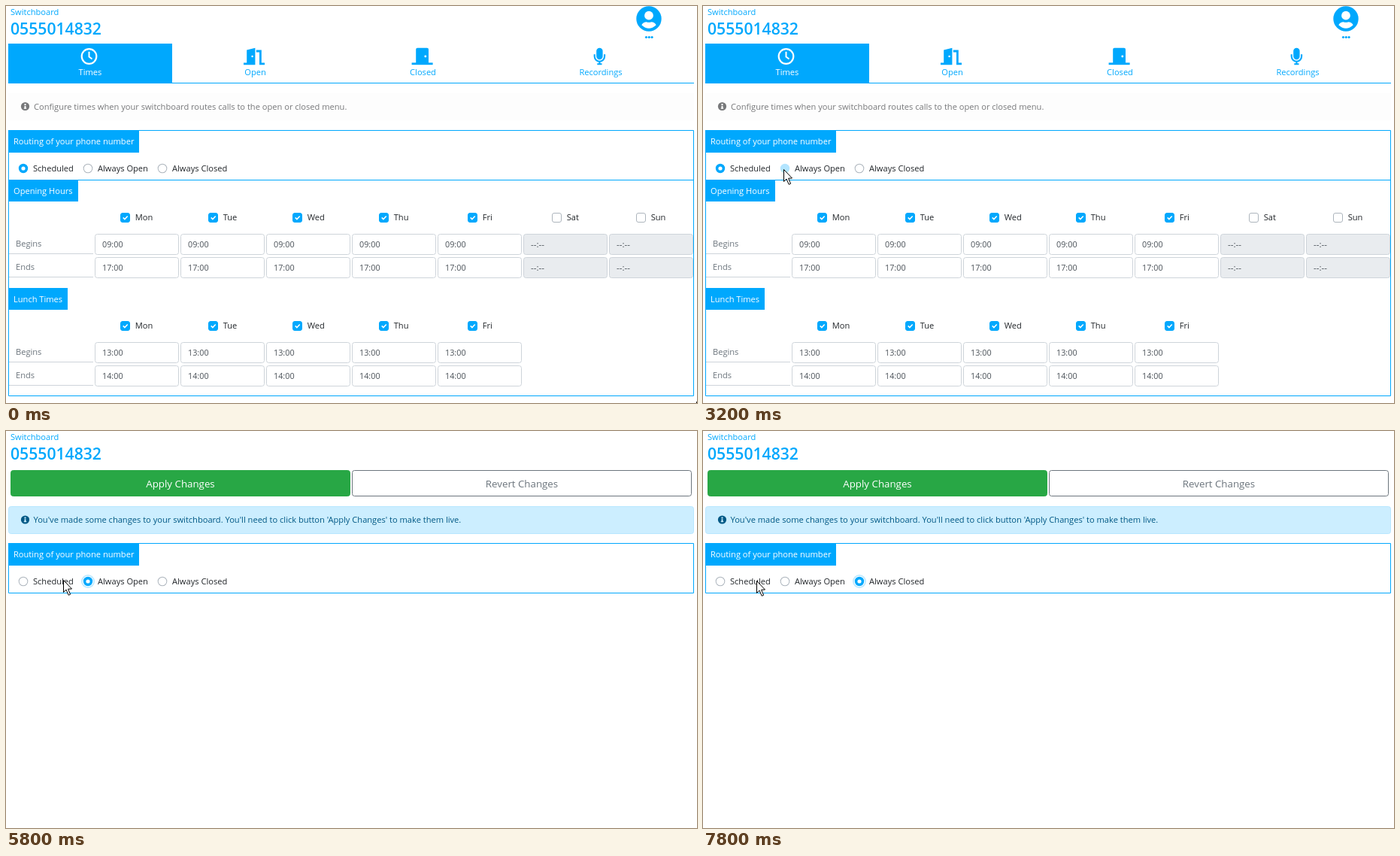
An HTML page with a canvas that plays this animation: 919 by 528 pixels, repeating every 8000 ms.

```html
<!DOCTYPE html>
<html lang="en">
<head>
<meta charset="utf-8">
<title>Switchboard times</title>
<style>
html, body { margin: 0; width: 100%; height: 100%; overflow: hidden; background: #fff; }
canvas { display: block; }
</style>
</head>
<body>
<canvas id="stage" width="919" height="528"></canvas>
<script>
const ctx = document.getElementById('stage').getContext('2d');
const LOOP = 8000, TICK = 200;
const BLUE = '#00a8fd', INK = '#212529', GREY = '#6c757d', PALE = '#ced4da';
const FAMILY = '"Open Sans", "Noto Sans", sans-serif';

// Pointer moves between rests.
const MOVES = [
  { from: 600, to: 1400, x: 39, y: 115 },
  { from: 2400, to: 2400, x: 52, y: 159 },
  { from: 2600, to: 3200, x: 107, y: 217 },
  { from: 4400, to: 4600, x: 190, y: 205 },
  { from: 5200, to: 5600, x: 27, y: 199 },
  { from: 5800, to: 5800, x: 76, y: 198 },
  { from: 6000, to: 6000, x: 263, y: 199 },
  { from: 6200, to: 6600, x: 203, y: 199 },
  { from: 7600, to: 7800, x: 71, y: 199 }
];

function setFont(size = 11.1, weight = 400) {
  ctx.font = `${weight} ${size}px ${FAMILY}`;
}

function widthOf(str) {
  setFont();
  return ctx.measureText(str).width;
}

function text(str, x, y, color = INK, size, weight, align = 'left') {
  setFont(size, weight);
  ctx.textAlign = align;
  ctx.fillStyle = color;
  ctx.fillText(str, x, y);
}

function rect(x, y, w, h, color) {
  ctx.fillStyle = color;
  ctx.fillRect(x, y, w, h);
}

function rounded(x, y, w, h, r, color) {
  ctx.fillStyle = color;
  ctx.beginPath();
  ctx.roundRect(x, y, w, h, r);
  ctx.fill();
}

function disc(x, y, r, color) {
  ctx.fillStyle = color;
  ctx.beginPath();
  ctx.arc(x, y, r, 0, Math.PI * 2);
  ctx.fill();
}

function panel(x, y, w, h, r, fill, border) {
  rounded(x + 0.5, y + 0.5, w - 1, h - 1, r, fill);
  ctx.strokeStyle = border;
  ctx.lineWidth = 1;
  ctx.stroke();
}

function stroke(path, color, width) {
  ctx.strokeStyle = color;
  ctx.lineWidth = width;
  ctx.stroke(new Path2D(path));
}

function infoIcon(x, y, color, back) {
  disc(x, y, 5.6, color);
  rect(x - 1, y - 3.5, 2, 2, back);
  rect(x - 1, y - 0.7, 2, 3.6, back);
  rect(x - 1.7, y + 2, 3.4, 1.2, back);
}

function heading(str, y, h) {
  rect(3, y, Math.round(widthOf(str) + 14), h, BLUE);
  text(str, 10, y + 19, '#fff');
}

function radio(x, y, state) {
  if (state === 'focus') {
    disc(x, y, 9, '#bfeaff');
    disc(x, y, 7.2, '#fff');
  }
  if (state === 'on' || state === 'focus') {
    disc(x, y, 6.2, BLUE);
    disc(x, y, 2.6, '#fff');
  } else if (state === 'active') {
    disc(x, y, 6.2, '#b3e5ff');
  } else {
    disc(x, y, 6.3, '#adb5bd');
    disc(x, y, 5.3, '#fff');
  }
}

function radios(y, ...states) {
  let x = 23;
  ['Scheduled', 'Always Open', 'Always Closed'].forEach((name, i) => {
    radio(x, y, states[i]);
    text(name, x + 13, y + 4);
    x = Math.round(x + 32 + widthOf(name));
  });
}

function checkbox(x, y, on) {
  const color = on ? BLUE : '#adb5bd';
  panel(x - 6, y - 6, 13, 13, 2.5, on ? BLUE : '#fff', color);
  if (on) stroke(`M${x - 2.3} ${y + 0.4}l2.2 2.2l3.8 -4.2`, '#fff', 1.5);
}

function schedule(y, days, begins, ends) {
  const names = ['Mon', 'Tue', 'Wed', 'Thu', 'Fri', 'Sat', 'Sun'];
  for (let i = 0; i < days; i++) {
    const x = Math.round(180 + 114 * i - (19.9 + widthOf(names[i])) / 2);
    checkbox(x, y, i < 5);
    text(names[i], x + 13.7, y + 4);
  }
  [['Begins', begins], ['Ends', ends]].forEach(([name, value], row) => {
    const top = y + 22 + row * 31;
    text(name, 13, top + 17, GREY);
    rect(4, top + 26, 112, 1, PALE);
    for (let i = 0; i < days; i++) {
      const x = 118 + 114 * i, open = i < 5;
      panel(x, top, 112, 28, 3, open ? '#fff' : '#e9ecef', PALE);
      text(open ? value : '--:--', x + 10, top + 18, '#495057', open ? 10.8 : 11.6);
    }
  });
}

function header() {
  text('Switchboard', 6, 12, BLUE);
  text('0555014832', 6, 38, BLUE, 21.2, 600);
}

function accountIcon(x, y) {
  disc(x, y, 16.7, BLUE);
  disc(x, y - 4.3, 5.9, '#fff');
  ctx.fill(new Path2D(`M${x - 9.7} ${y + 8.2}q2.2 -4 6.5 -4q3.2 1 6.4 0q4.3 0 6.5 4q-9.7 9.2 -19.4 0`));
  for (let i = -1; i <= 1; i++) disc(x + 0.3 + i * 3.8, y + 24.5, 1.6, BLUE);
}

function clockIcon(x, y) {
  ctx.beginPath();
  ctx.arc(x, y, 9.8, 0, Math.PI * 2);
  ctx.strokeStyle = '#fff';
  ctx.lineWidth = 2.2;
  ctx.stroke();
  stroke(`M${x} ${y - 6.2}v6.7l4 3`, '#fff', 2);
}

function openDoorIcon(x, y) {
  ctx.fillStyle = BLUE;
  ctx.fill(new Path2D(`M${x} ${y + 22.4}v-2.8h4.2v-17l11.2 -2.6v22.4z`));
  disc(x + 11.6, y + 11.2, 1.2, '#fff');
  stroke(`M${x + 16.8} ${y + 4.2}h5.6v16.8h5.6`, BLUE, 2.8);
}

function closedDoorIcon(x, y) {
  rounded(x + 5.6, y, 16.8, 21, [2, 2, 0, 0], BLUE);
  rect(x, y + 19.6, 28, 2.8, BLUE);
  disc(x + 18.2, y + 11.2, 1.4, '#fff');
}

function micIcon(x, y) {
  rounded(x - 4.2, y, 8.4, 15.4, 4.2, BLUE);
  stroke(`M${x - 6.7} ${y + 8.4}v2.8a6.7 6.7 0 0 0 13.4 0v-2.8M${x} ${y + 18}v3.4m-3.1 0h6.2`, BLUE, 2.1);
}

function tab(name, x, color) {
  text(name, x, 92, color, 11.1, 400, 'center');
}

function timesPage(pressed) {
  accountIcon(855, 17);
  rect(3, 50, 218, 52, BLUE);
  rect(3, 102, 912, 1, BLUE);
  clockIcon(110.5, 67);
  tab('Times', 112, '#fff');
  openDoorIcon(316, 55.8);
  tab('Open', 331.5, BLUE);
  closedDoorIcon(539.6, 55.8);
  tab('Closed', 554.5, BLUE);
  micIcon(789.4, 55.8);
  tab('Recordings', 791, BLUE);

  rect(3, 116, 912, 36, '#fdfdfd');
  infoIcon(25.5, 133.5, '#77787a', '#fff');
  text('Configure times when your switchboard routes calls to the open or closed menu.', 37, 138, '#77787a');

  panel(3, 165, 912, 354, 0, '#fff', BLUE);
  rect(3, 231, 912, 1, BLUE);
  heading('Routing of your phone number', 165, 30);
  radios(216, 'on', pressed ? 'active' : 'off', 'off');
  heading('Opening Hours', 231, 29);
  schedule(281, 7, '09:00', '17:00');
  heading('Lunch Times', 375, 29);
  schedule(425, 5, '13:00', '14:00');
}

function button(name, x, fill, border, color) {
  panel(x, 52, 452, 35, 3, fill, border);
  text(name, x + 226, 75, color, 13.3, 400, 'center');
}

function changesPage(t) {
  button('Apply Changes', 6, '#28a745', '#28a745', '#fff');
  button('Revert Changes', 460, '#fff', GREY, GREY);

  panel(3, 100, 912, 37, 3, '#cceeff', '#b8e7ff');
  infoIcon(25.5, 118, '#005885', '#cceeff');
  text("You've made some changes to your switchboard. You'll need to click button 'Apply Changes' to make them live.",
    36.5, 122, '#005885');

  panel(3, 149, 912, 67, 0, '#fff', BLUE);
  heading('Routing of your phone number', 149, 30);
  if (t < 6800) radios(200, 'off', 'focus', 'off');
  else if (t < 7000) radios(200, 'off', 'on', 'active');
  else radios(200, 'off', 'off', 'focus');
}

function pointerAt(t) {
  let x = 918, y = 526;
  for (const move of MOVES) {
    if (t < move.from) break;
    const p = Math.min(1, (t - move.from + TICK) / (move.to - move.from + TICK));
    const eased = 1 - (1 - p) ** 2;
    x += (move.x - x) * eased;
    y += (move.y - y) * eased;
  }
  return [Math.round(x), Math.round(y)];
}

function pointer(x, y) {
  const arrow = new Path2D(`M${x + 0.5} ${y + 0.5}v16l3.5 -3.5l3.2 7.3l2.4 -1l-3 -7.1l4.9 -0.2z`);
  ctx.fillStyle = '#fff';
  ctx.fill(arrow);
  ctx.strokeStyle = '#000';
  ctx.lineWidth = 1;
  ctx.stroke(arrow);
}

function draw(now) {
  const t = Math.floor((now % LOOP) / TICK) * TICK;
  rect(0, 0, 919, 528, '#fff');
  header();
  if (t < 3400) timesPage(t >= 3200);
  else changesPage(t);
  pointer(...pointerAt(t));
}

const start = performance.now();
function loop() {
  draw(performance.now() - start);
  requestAnimationFrame(loop);
}
loop();
</script>
</body>
</html>
```
